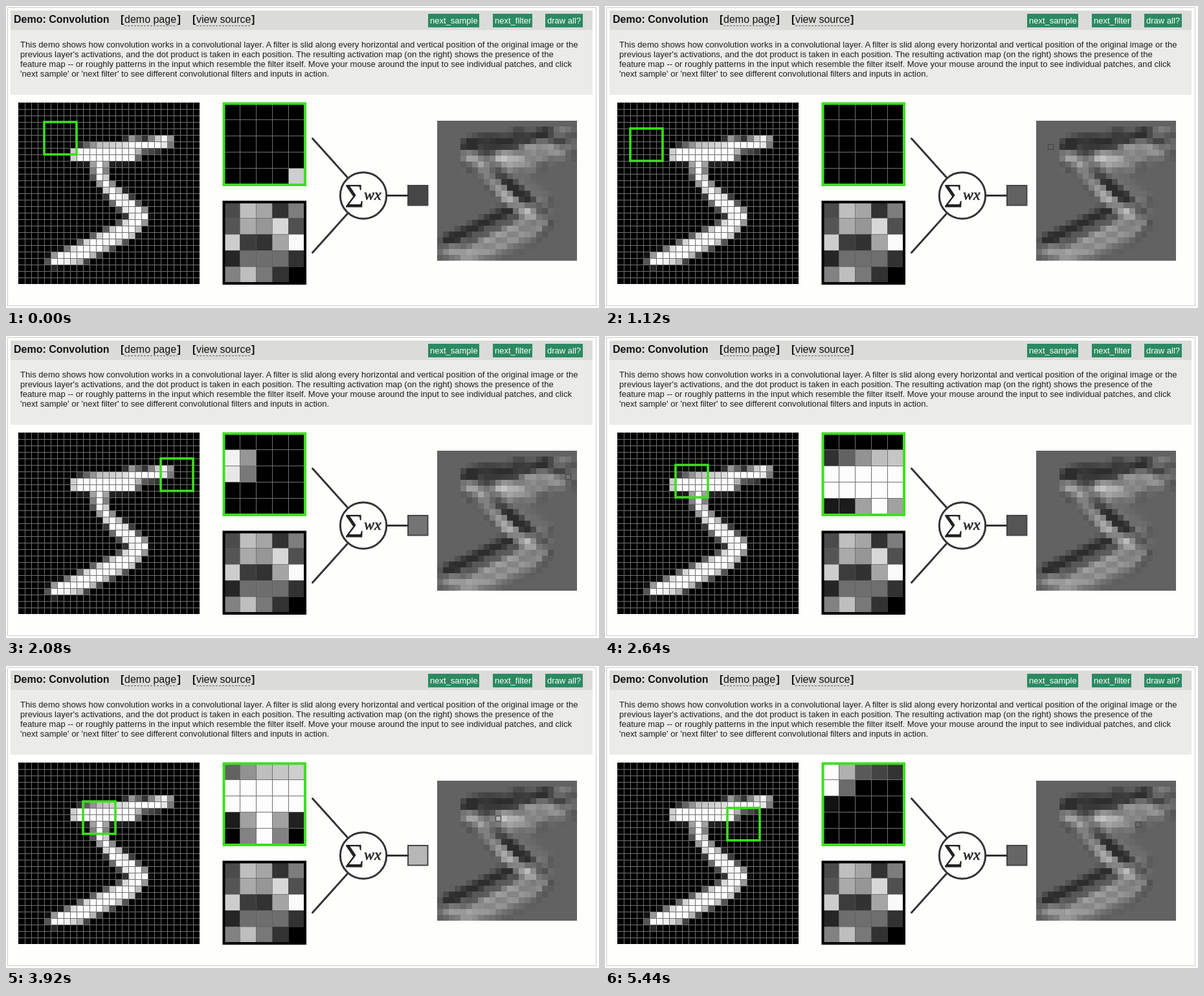
An HTML page with a canvas for the animation above (5.52 s loop, 916 by 466 pixels).

```html
<!DOCTYPE html>
<html lang="en">
<head>
<meta charset="utf-8">
<title>Convolution demo</title>
<style>
html, body { margin: 0; width: 100%; height: 100%; overflow: hidden; background: #fefefd; }
canvas, svg { position: absolute; left: 0; top: 0; width: 916px; height: 466px; }
text { font-family: "Liberation Sans", Arial, sans-serif; white-space: pre; }
.head { font-size: 16px; fill: #111; }
.bold { font-weight: bold; }
.body { font-size: 13.09px; fill: #1c1c1c; }
.button { font-size: 13px; fill: #fff; }
.math { font-family: "Liberation Serif", Times, serif; fill: #222; }
.wire { fill: none; stroke: #333; stroke-width: 3; stroke-linecap: round; }
.dash { stroke: #666; stroke-dasharray: 3 2; }
</style>
</head>
<body>
<canvas id="stage" width="916" height="466"></canvas>
<svg viewBox="0 0 916 466">
  <rect x="2.5" y="2.5" width="909" height="460" fill="none" stroke="#ccc"/>
  <rect x="7" y="7" width="899" height="30" fill="#dbdbda"/>
  <rect x="7" y="37" width="899" height="100" fill="#ebebe9"/>

  <text class="head bold" x="12" y="26">Demo: Convolution</text>
  <text class="head bold" x="177" y="26">[</text>
  <text class="head" x="183" y="26">demo page</text>
  <text class="head bold" x="264.5" y="26">]</text>
  <text class="head bold" x="288" y="26">[</text>
  <text class="head" x="294" y="26">view source</text>
  <text class="head bold" x="379" y="26">]</text>
  <path class="dash" d="M183 30.5H264M294 30.5H378"/>

  <path fill="#2b8a62" d="M652 12h79v21h-79zM752 12h61v21h-61zM833 12h58v21h-58z"/>
  <text class="button" x="655" y="27">next_sample</text>
  <text class="button" x="755" y="27">next_filter</text>
  <text class="button" x="836" y="27">draw all?</text>

  <text class="body" x="22" y="64">This demo shows how convolution works in a convolutional layer. A filter is slid along every horizontal and vertical position of the original image or the</text>
  <text class="body" x="22" y="79">previous layer's activations, and the dot product is taken in each position. The resulting activation map (on the right) shows the presence of the</text>
  <text class="body" x="22" y="94">feature map -- or roughly patterns in the input which resemble the filter itself. Move your mouse around the input to see individual patches, and click</text>
  <text class="body" x="22" y="109">'next sample' or 'next filter' to see different convolutional filters and inputs in action.</text>

  <path class="wire" d="M473.5 204.5L527 264M473.5 380.5L527 321M588 292.5H621"/>
  <circle class="wire" cx="552" cy="292.5" r="35.7"/>
  <text class="math" x="523" y="310.5" font-size="52">Σ</text>
  <text class="math" x="553" y="299" font-size="24" font-style="italic" stroke="#222" stroke-width=".6">wx</text>
</svg>
<script>
const ctx = document.getElementById("stage").getContext("2d");
const SIZE = 28, K = 5, OUT = 24;
const CELL = 10, ZOOM = 25, DOT = 9;
const STEP = 80, LOOP = 5520;
const GREEN = "#3be01c", GRID = "#707070", PAPER = "#fefefd";

// Brush paths of the digit in grid cells: x, y, radius.
const bar = [[8.6, 7.5, 1.1], [12, 7.2, 1.45], [16.7, 7.1, 1.5]];
const arm = [[17, 6, 1.1], [19, 6.1, .75], [21, 5.7, 1], [22.3, 5.4, .9]];
const stem = [
  [12, 8.5, 1.2], [12, 10.5, .95], [13.1, 12.3, .85], [15, 14.2, 1.2], [16.8, 15.7, 1.15],
  [18.2, 17, 1.35], [16.5, 19, 1.4], [8.5, 22.9, 1.4], [5, 23.8, .85]
];

// The 5 by 5 kernel, as grey levels.
const kernel = [
  [75, 190, 165, 50, 125],
  [85, 170, 150, 215, 80],
  [205, 60, 50, 165, 250],
  [38, 110, 110, 110, 50],
  [130, 190, 120, 50, 0]
];
const ZERO = 115, REST = 98, GAIN = .3;

const clamp = (v, lo = 0, hi = 1) => Math.max(lo, Math.min(hi, v));
const grey = v => `rgb(${[v, v, v].map(Math.round)})`;

// Soft-edged cover of one cell by a brush moving from a to b.
function cover(x, y, a, b) {
  const dx = b[0] - a[0], dy = b[1] - a[1];
  const t = clamp(((x - a[0]) * dx + (y - a[1]) * dy) / (dx * dx + dy * dy));
  const gap = Math.hypot(x - a[0] - t * dx, y - a[1] - t * dy);
  return clamp(a[2] + t * (b[2] - a[2]) - gap + .5);
}

function paint(x, y) {
  let best = 0;
  for (const path of [bar, arm, stem])
    for (let i = 1; i < path.length; i++)
      best = Math.max(best, cover(x, y, path[i - 1], path[i]));
  return best;
}

const digit = Array.from({ length: SIZE }, (_, r) =>
  Array.from({ length: SIZE }, (_, c) => paint(c, r)));
const ink = (col, row) => col < SIZE ? digit[row][col] : 0;

// Grey level of the filter response at one position.
function response(col, row) {
  let sum = 0;
  for (let y = 0; y < K; y++)
    for (let x = 0; x < K; x++)
      sum += ink(col + x, row + y) * (kernel[y][x] - ZERO);
  return clamp(REST + sum * GAIN, 45, 200);
}

function box(x, y, w, h, fill) {
  ctx.fillStyle = fill;
  ctx.fillRect(x, y, w, h);
}

function frame(x, y, side, color, line) {
  ctx.strokeStyle = color;
  ctx.lineWidth = line;
  ctx.strokeRect(x, y, side, side);
}

function cells(x, y, n, size, shade, line) {
  for (let r = 0; r < n; r++)
    for (let c = 0; c < n; c++)
      box(x + c * size, y + r * size, size, size, grey(shade(c, r)));
  if (!line) return;
  for (let i = 1; i < n; i++) {
    box(x + i * size, y, 1, n * size, line);
    box(x, y + i * size, n * size, 1, line);
  }
}

// Everything that stays put is painted once.
function backdrop() {
  cells(19, 149, SIZE, CELL, (c, r) => 253 * ink(c, r), GRID);
  cells(336, 302, K, ZOOM, (c, r) => kernel[r][c], "rgba(90,90,90,.6)");
  frame(336.5, 302.5, 125.5, "#000", 4);
  cells(666, 177, OUT, DOT, response);
  return ctx.getImageData(0, 0, 916, 466);
}
const still = backdrop();

function draw(tick) {
  // The window scans 25 columns per row, five cells every three ticks.
  const pos = 79 + Math.floor(tick * 5 / 3);
  const col = pos % 25, row = Math.floor(pos / 25);
  ctx.putImageData(still, 0, 0);

  frame(19 + col * CELL, 149 + row * CELL, K * CELL, GREEN, 3.6);
  cells(336, 150, K, ZOOM, (c, r) => 253 * ink(col + c, row + r), GRID);
  frame(336.5, 150.5, 125.5, GREEN, 4);

  box(621, 277, 31, 31, col < OUT ? grey(response(col, row)) : PAPER);
  frame(621, 277, 30.5, "#444", 2);
  frame(666.5 + col * DOT, 177.5 + row * DOT, DOT - 1, "#484848", 1.3);
}

const start = performance.now();
let shown = -1;
function play() {
  const tick = Math.floor((performance.now() - start) % LOOP / STEP);
  if (tick !== shown) draw(shown = tick);
  requestAnimationFrame(play);
}
play();
</script>
</body>
</html>
```
